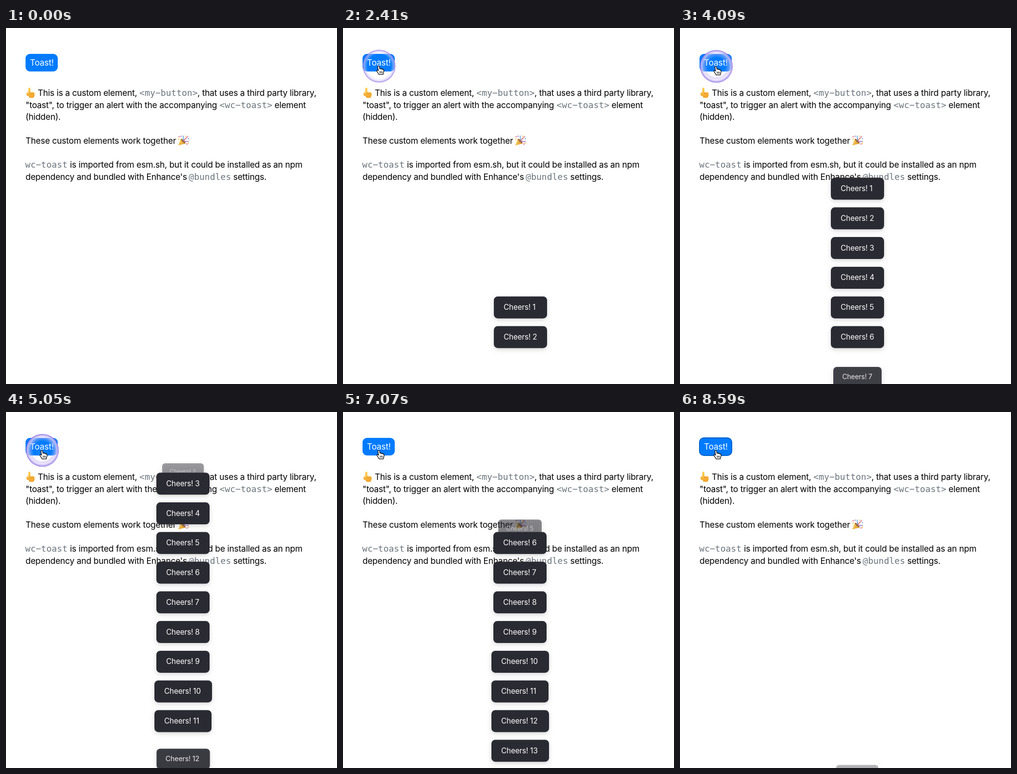
These frames come from a looping animation (678 by 729 pixels, 8670 ms). An HTML page with a canvas:

```html
<!DOCTYPE html>
<html lang="en">
<head>
<meta charset="utf-8">
<title>Toast demo</title>
<style>
  html, body { margin: 0; width: 100%; height: 100%; overflow: hidden; background: #fff; }
  canvas { display: block; }
</style>
</head>
<body>
<canvas id="stage" width="678" height="729"></canvas>
<script>
const ctx = document.getElementById('stage').getContext('2d', { alpha: false });
const LOOP = 8670;
const SANS = 'Inter, "Liberation Sans", sans-serif';
const CODE = '18px "DejaVu Sans Mono", monospace';

const clicks = [815, 1567, 2375, 3000, 3596, 3790, 3987, 4180, 4370, 4560, 4745, 4933, 5088];
const LIFETIME = 3450, ENTER = 300, LEAVE = 200;
const SLOT_BOTTOM = 693.7, SLOT_STEP = 60.77, TOAST_H = 45;
const HOLD = 200, SHRINK = 600, PRESS_LEAD = 120, RING_R = 33.5;
const CURSOR_IN = 330, FOCUS_AT = 8030;

const clamp = v => Math.max(0, Math.min(1, v));

function bezier(x1, y1, x2, y2) {
  const axis = (a, b, s) => 3 * (1 - s) ** 2 * s * a + 3 * (1 - s) * s * s * b + s ** 3;
  return x => {
    let lo = 0, hi = 1;
    for (let i = 0; i < 24; i++) {
      const mid = (lo + hi) / 2;
      if (axis(x1, x2, mid) < x) lo = mid; else hi = mid;
    }
    return x <= 0 ? 0 : x >= 1 ? 1 : axis(y1, y2, lo);
  };
}
const easeEnter = bezier(.21, 1.02, .73, 1);
const easeLeave = bezier(.06, .71, .55, 1);

function step(t) {
  const grid = from => from + Math.floor((t - from) / 80) * 80;
  if (t < 330) return 0;
  if (t < 6170) return grid(330);
  if (t < 6500) return 6170;
  if (t < 6820) return grid(6500);
  if (t < 7070) return 6820;
  return grid(7070);
}

function text(str, x, y, font = `17.35px ${SANS}`, color = '#000', spacing = '-0.2px') {
  ctx.font = font;
  ctx.letterSpacing = spacing;
  ctx.fillStyle = color;
  ctx.fillText(str, x, y);
}

// The wide minus stands in for this font's short hyphen.
const code = (str, x, y) => text(str.replaceAll('-', '\u2212'), x, y, CODE, '#6c757d', '0px');

function box(x, y, w, h, r, color) {
  ctx.fillStyle = color;
  ctx.beginPath();
  ctx.roundRect(x, y, w, h, r);
  ctx.fill();
}

function drawPointingHand(x, y) {
  ctx.save();
  ctx.translate(x, y);
  const skin = ctx.createLinearGradient(0, 0, 0, 22);
  skin.addColorStop(0, '#ffd557');
  skin.addColorStop(1, '#f0a02c');
  box(5.6, 0.5, 4.4, 15, 2.2, skin);
  box(5.2, 10, 13.6, 9.5, 4, skin);
  box(7, 14, 10.5, 7.5, 2.5, skin);
  box(2, 10.5, 5, 7, 2.5, skin);
  ctx.strokeStyle = '#d98a1f';
  ctx.lineWidth = 0.8;
  for (const fx of [10.2, 13.2, 16]) {
    ctx.beginPath();
    ctx.moveTo(fx, 10.5);
    ctx.lineTo(fx - 0.2, 15);
    ctx.stroke();
  }
  ctx.restore();
}

function drawPopper(x, y) {
  ctx.save();
  ctx.translate(x, y);
  const gold = ctx.createLinearGradient(2, 10, 15, 20);
  gold.addColorStop(0, '#ffd65c');
  gold.addColorStop(1, '#d4902b');
  ctx.fillStyle = gold;
  ctx.beginPath();
  ctx.moveTo(0.5, 21);
  ctx.lineTo(5.5, 7);
  ctx.quadraticCurveTo(13, 9, 15.5, 17);
  ctx.closePath();
  ctx.fill();
  ctx.fillStyle = '#a8703f';
  ctx.beginPath();
  ctx.ellipse(10.5, 12, 6.4, 2.3, Math.PI / 4, 0, 7);
  ctx.fill();
  ctx.lineWidth = 1.5;
  const streamer = (color, ...p) => {
    ctx.strokeStyle = color;
    ctx.beginPath();
    ctx.moveTo(p[0], p[1]);
    ctx.bezierCurveTo(...p.slice(2));
    ctx.stroke();
  };
  streamer('#5aa2dd', 10, 11, 14, 8, 8, 4, 11, 1);
  streamer('#d4548f', 12, 12, 14, 5, 17, 8, 20, 2);
  streamer('#9a6bc9', 13, 14, 16, 10, 18, 15, 22, 12);
  const bits = [[2, 3, '#e25563'], [6, 2, '#9a6bc9'], [16, 2, '#f0b73a'], [21, 7, '#5aa2dd'],
    [18, 18, '#e25563'], [21, 16, '#f0b73a'], [1.5, 8, '#f0b73a'], [15, 7, '#e28a49']];
  for (const [bx, by, color] of bits) box(bx - 1, by - 1, 2.2, 2.2, 0.6, color);
  ctx.restore();
}

function drawPage(t) {
  if (t >= FOCUS_AT) {
    box(39, 52, 68, 38, 10, '#0062cc');
    box(41, 54, 64, 34, 8, '#007bff');
  } else {
    box(40, 53, 66, 36, 9, '#007bff');
  }
  text('Toast!', 49, 77, undefined, '#fff');

  drawPointingHand(40, 121.5);
  text('This is a custom element,', 65, 139);
  code('<my-button>', 273.3, 139);
  text(', that uses a third party library,', 392.3, 139);
  text('"toast", to trigger an alert with the accompanying', 40, 164);
  code('<wc-toast>', 437.3, 164);
  text('element', 550, 164);
  text('(hidden).', 40, 188);
  text('These custom elements work together', 40, 237);
  drawPopper(352.5, 219.5);
  code('wc-toast', 39.3, 286);
  text('is imported from esm.sh, but it could be installed as an npm', 131, 286);
  text("dependency and bundled with Enhance's", 40, 311);
  code('@bundles', 374.3, 311);
  text('settings.', 465.5, 311);
}

function drawToast(i, t) {
  const age = t - clicks[i];
  if (age < 0 || age >= LIFETIME + LEAVE) return;
  const n = i + 1;
  const slot = clicks.filter(c => c > clicks[i] && c <= t).length;
  const entering = 1 - easeEnter(clamp(age / ENTER));
  const leaving = easeLeave(clamp((age - LIFETIME) / LEAVE));
  const scale = 1 - 0.4 * (entering + leaving);
  const w = n < 10 ? 109 : n === 11 ? 117 : 118;
  const middle = t >= clicks[9] ? 363 : 363.5;
  const left = Math.floor(middle - w / 2);
  const y = SLOT_BOTTOM - slot * SLOT_STEP + TOAST_H * (2 * entering + 1.5 * leaving);

  ctx.save();
  ctx.globalAlpha = 1 - 0.5 * entering - leaving;
  ctx.translate(left + w / 2, y);
  ctx.scale(scale, scale);
  ctx.shadowColor = 'rgba(0,0,0,.16)';
  ctx.shadowBlur = 9;
  ctx.shadowOffsetY = 3;
  box(-w / 2, -TOAST_H / 2, w, TOAST_H, 8, '#2a2a32');
  ctx.shadowColor = 'transparent';
  text('Cheers! ' + n, 20 - w / 2, 5, `15.4px ${SANS}`, '#fff', '-0.2px');
  ctx.restore();
}

function drawRing(x, y, r, alpha) {
  if (r <= 0 || alpha <= 0) return;
  const glow = ctx.createRadialGradient(x, y, 0, x, y, r);
  glow.addColorStop(0.72, 'rgba(225,217,250,0)');
  glow.addColorStop(0.87, 'rgba(215,205,248,.45)');
  glow.addColorStop(0.95, 'rgba(185,167,238,.75)');
  glow.addColorStop(1, 'rgba(135,105,218,.9)');
  ctx.globalAlpha = alpha;
  ctx.fillStyle = glow;
  ctx.beginPath();
  ctx.arc(x, y, r, 0, 2 * Math.PI);
  ctx.fill();
  ctx.globalAlpha = 1;
}

function drawRings(t, x, y) {
  for (const c of clicks) {
    const press = clamp((t - c + PRESS_LEAD) / PRESS_LEAD);
    const u = clamp((t - c - HOLD) / SHRINK);
    if (press > 0 && u < 1) drawRing(x, y, RING_R * (1 - u * u), press * (1 - u));
  }
}

function drawCursor(x, y) {
  ctx.save();
  ctx.translate(x, y);
  ctx.beginPath();
  ctx.moveTo(-3, 2);
  ctx.bezierCurveTo(-3, -0.6, 0.4, -0.6, 0.6, 2);
  ctx.lineTo(1.2, 6);
  ctx.bezierCurveTo(2, 4.8, 4, 5, 4.2, 6.8);
  ctx.bezierCurveTo(5.2, 5.6, 7, 6.2, 7.1, 7.6);
  ctx.bezierCurveTo(8.4, 6.8, 9.8, 7.6, 9.7, 9.4);
  ctx.bezierCurveTo(9.8, 13, 8.4, 14, 8, 17.6);
  ctx.lineTo(-0.6, 17.6);
  ctx.bezierCurveTo(-1, 15, -4.6, 12.4, -5, 10);
  ctx.bezierCurveTo(-5, 8, -2.8, 8.2, -1.6, 10);
  ctx.closePath();
  ctx.fillStyle = '#fff';
  ctx.strokeStyle = '#000';
  ctx.lineWidth = 1.3;
  ctx.lineJoin = 'round';
  ctx.fill();
  ctx.stroke();
  ctx.lineWidth = 1;
  for (const fx of [1.6, 3.9, 6.2]) {
    ctx.beginPath();
    ctx.moveTo(fx, 11);
    ctx.lineTo(fx, 15);
    ctx.stroke();
  }
  ctx.restore();
}

function draw(t) {
  ctx.fillStyle = '#fff';
  ctx.fillRect(0, 0, 678, 729);
  drawPage(t);
  clicks.forEach((_, i) => drawToast(i, t));
  if (t < CURSOR_IN) return;
  const nudge = t < 3000 ? 0 : 1;
  drawRings(t, 74 + nudge / 2, 78 + nudge / 2);
  drawCursor(74 + nudge / 2, 77.5 + nudge);
}

const start = performance.now();
function tick() {
  draw(step((performance.now() - start) % LOOP));
  requestAnimationFrame(tick);
}
tick();
</script>
</body>
</html>
```
